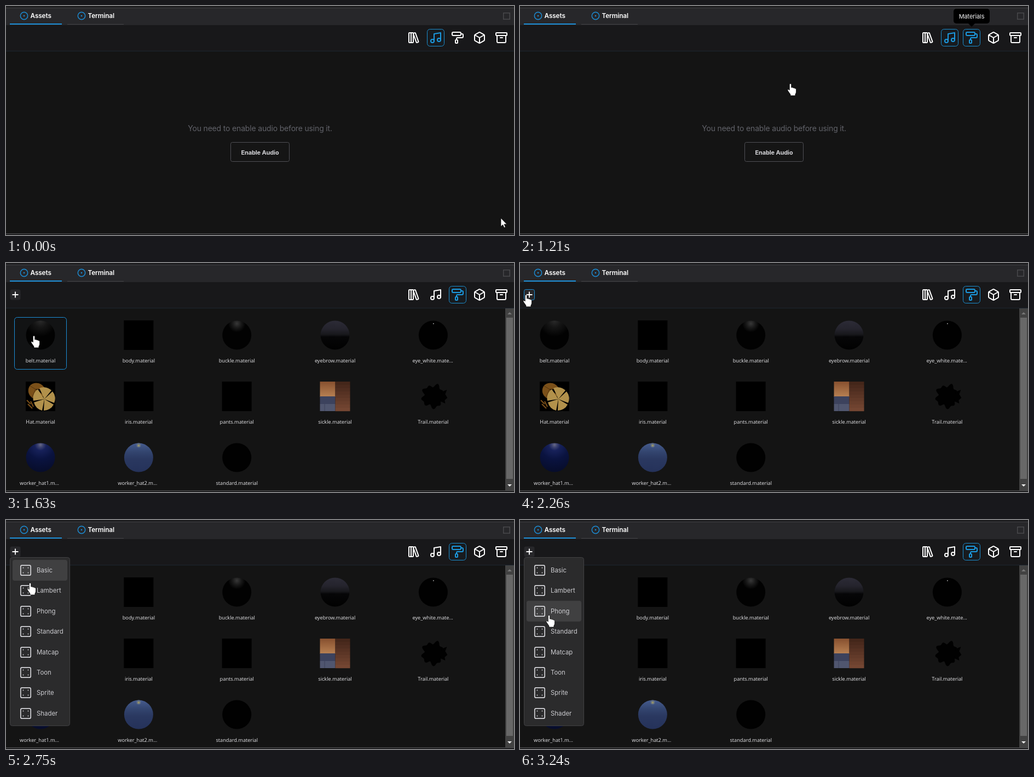
These frames come from a looping animation (928x419 px, 3.58 s). An HTML page:

```html
<!DOCTYPE html>
<html lang="en">
<head>
<meta charset="utf-8">
<title>Asset browser</title>
<style>
  html, body { margin: 0; width: 100%; height: 100%; overflow: hidden; background: #141414; }
  svg { display: block; width: 928px; height: 419px; }
  text { font-family: Inter, "Noto Sans", sans-serif; }
  .label { font: 500 9.3px "Open Sans", "Noto Sans", sans-serif; fill: #e4e4e7; letter-spacing: -.04px; }
  .tab { font-size: 11.8px; font-weight: 600; fill: #fff; letter-spacing: -.12px; }
  .icon { fill: none; stroke: #fff; stroke-width: 2; stroke-linecap: round; stroke-linejoin: round; }
  .tool.on .icon { stroke: #1c9ae0; }
  .tool .frame { fill: #171b1f; stroke: #1c8fd0; visibility: hidden; }
  .tool.on .frame { visibility: visible; }
  .entry { font-size: 11.4px; fill: #cbcbcf; }
</style>
</head>
<body>
<svg id="stage" viewBox="0 0 928 419" xmlns="http://www.w3.org/2000/svg"></svg>
<script>
const LOOP = 3580;
const BLUE = '#1c8fd8';
const stage = document.getElementById('stage');

const rect = (x, y, w, h, fill, extra = '') =>
  `<rect x="${x}" y="${y}" width="${w}" height="${h}" fill="${fill}" ${extra}/>`;
const disc = (x, y, r, fill, extra = '') =>
  `<circle cx="${x}" cy="${y}" r="${r}" fill="${fill}" ${extra}/>`;
const path = (d, fill, extra = '') => `<path d="${d}" fill="${fill}" ${extra}/>`;
const text = (x, y, str, extra = '') => `<text x="${x}" y="${y}" ${extra}>${str}</text>`;
const group = (id, body, extra = '') => `<g id="${id}" ${extra}>${body}</g>`;
const stops = list => list.map(([at, color]) => `<stop offset="${at}" stop-color="${color}"/>`).join('');
const radial = (id, cy, r, list) =>
  `<radialGradient id="${id}" cx=".5" cy="${cy}" r="${r}">${stops(list)}</radialGradient>`;
const vertical = (id, list) =>
  `<linearGradient id="${id}" x2="0" y2="1">${stops(list)}</linearGradient>`;

const defs = `<defs>
  ${radial('belt', 0, .55, [[0, '#2b2b2b'], [.4, '#161616'], [1, '#020202']])}
  ${radial('buckle', .1, .3, [[0, '#383838'], [.5, '#191919'], [1, '#020202']])}
  ${vertical('eyebrow', [[0, '#2c2b36'], [.28, '#25242d'], [.48, '#17171b'], [.56, '#060607'], [1, '#010101']])}
  ${radial('navy', .06, .9, [[0, '#686a86'], [.1, '#3c4270'], [.22, '#17215a'], [.55, '#0a1340'], [1, '#070d2c']])}
  ${vertical('denim', [[0, '#465c8e'], [.3, '#33456f'], [.55, '#2a3860'], [1, '#25325a']])}
  ${vertical('copper', [[0, '#87502f'], [1, '#b88153']])}
</defs>`;

// Header and tool bar
const tab = (x, name) =>
  disc(x, 18, 6.7, 'none', `stroke="${BLUE}" stroke-width="1.4"`) + disc(x, 18, 1.3, BLUE) +
  text(x + 11.5, 22, name, 'class="tab"');

const header =
  rect(0, 0, 928, 419, '#141414') + rect(0, 0, 928, 3, '#1c1c1e') + rect(0, 3, 928, 1, '#424245') +
  rect(0, 4, 928, 31, '#27272a') + rect(0, 35, 928, 47, '#18181a') + rect(0, 82, 928, 1, '#1d2630') +
  tab(33, 'Assets') + tab(138, 'Terminal') +
  rect(7, 32, 95, 2, BLUE) + rect(112, 33, 103, 1, '#424245') +
  rect(908.75, 12.75, 11.5, 11.5, 'none', 'stroke="#48484b" stroke-width="1.5"');

const toolIcons = [
  '<rect width="8" height="18" x="3" y="3" rx="1"/><path d="M7 3v18M20.4 18.9c.2.5-.1 1.1-.6 1.3l-1.9.7c-.5.2-1.1-.1-1.3-.6L11.1 5.1c-.2-.5.1-1.1.6-1.3l1.9-.7c.5-.2 1.1.1 1.3.6Z"/>',
  '<path d="M9 18V5l12-2v13"/><circle cx="6" cy="18" r="3"/><circle cx="18" cy="16" r="3"/>',
  '<rect width="16" height="6" x="2" y="2" rx="2"/><path d="M10 16v-2a2 2 0 0 1 2-2h8a2 2 0 0 0 2-2V7a2 2 0 0 0-2-2h-2"/><rect width="4" height="6" x="8" y="16" rx="1"/>',
  '<path d="M21 8a2 2 0 0 0-1-1.73l-7-4a2 2 0 0 0-2 0l-7 4A2 2 0 0 0 3 8v8a2 2 0 0 0 1 1.73l7 4a2 2 0 0 0 2 0l7-4A2 2 0 0 0 21 16ZM3.3 7l8.7 5 8.7-5M12 22V12"/>',
  '<rect width="20" height="5" x="2" y="3" rx="1"/><path d="M4 8v11a2 2 0 0 0 2 2h12a2 2 0 0 0 2-2V8M10 12h4"/>'
];
const tools = toolIcons.map((body, i) => group('tool' + i,
  `<rect class="frame" x="${769.5 + 40 * i}" y="42.5" width="31" height="31" rx="5"/>`.replace(769.5 + 40 * i, 729.5 + 40 * i) +
  `<g class="icon" transform="translate(${733 + 40 * i} 46)">${body}</g>`, 'class="tool"')).join('');

const audioPanel =
  text(464, 229, 'You need to enable audio before using it.',
    'text-anchor="middle" font-size="14" letter-spacing="-.17" fill="#616269"') +
  rect(410.5, 249.5, 107, 35, '#151515', 'rx="3" stroke="#505055"') +
  text(464, 272, 'Enable Audio',
    'text-anchor="middle" font-size="11" font-weight="700" letter-spacing="-.13" fill="#d4d4d8"');

// Material thumbnails, drawn around their own centre
const ball = fill => disc(0, 0, 26.5, fill);
const block = rect(-27, -27, 54, 54, '#000');
const hat = block +
  path('M-9-13L6-2A18 18 0 0 1-14 3A15 15 0 0 1-18-21A17 17 0 0 1 8-14Z', '#7b5019') +
  path('M-9-13L8-14M-9-13L-16 3M-9-13L-19-19', 'none', 'stroke="#53340f"') +
  path('M7 5L-2-15A20 20 0 0 1 20-11ZM7 5L22-9A20 20 0 0 1 25 12ZM7 5L24 15A20 20 0 0 1 6 26ZM7 5L3 26A20 20 0 0 1-12 11ZM7 5L-13 8A20 20 0 0 1-5-13Z', '#b2914b') +
  path('M-25 7l7 7M-23 14l8 8M-18 9l5 10', 'none', 'stroke="#7b5019" stroke-width="2"');
const sickle = rect(-27.5, -27, 28, 28, 'url(#copper)') + rect(-27.5, 0, 28, 14, '#3c425d') +
  rect(-27.5, 14, 28, 13, '#50566f') + rect(-20, 14, 2, 13, '#464b64') +
  Array.from({ length: 9 }, (_, i) =>
    rect(.5, -27 + 6 * i, 27, 6.2, `rgb(${68 + 6 * i},${38 + 4 * i},${26 + 3 * i})`)).join('');
const blobEdge = Array.from({ length: 60 }, (_, i) => {
  const a = i * Math.PI / 30, r = 20 + 2.5 * Math.sin(9 * a) + 2 * Math.sin(5 * a + 1);
  return `${(r * Math.cos(a)).toFixed(1)} ${(r * Math.sin(a)).toFixed(1)}`;
}).join('L');
const trail = path(`M${blobEdge}Z`, '#010101') + path('M15-8L25-12 22-4 26 3 21 6 22 13 13 9Z', '#010101');

const materials = [
  ['belt.material', ball('url(#belt)')],
  ['body.material', block],
  ['buckle.material', ball('url(#buckle)')],
  ['eyebrow.material', ball('url(#eyebrow)')],
  ['eye_white.mate...', ball('#010101') + disc(.5, -21, .9, '#b0b0b0')],
  ['Hat.material', hat],
  ['iris.material', block],
  ['pants.material', block],
  ['sickle.material', sickle],
  ['Trail.material', trail],
  ['worker_hat1.m...', ball('url(#navy)')],
  ['worker_hat2.m...', ball('url(#denim)') + disc(0, -22.5, 4, '#626f83') + disc(0, -22, 2, '#96946a')],
  ['standard.material', ball('#010101')]
];
const grid = materials.map(([name, art], i) => {
  const x = 63 + 179.35 * (i % 5), y = 132 + 112 * Math.floor(i / 5);
  const cut = name.endsWith('...');
  return `<g transform="translate(${x} ${y})">${art}</g>` +
    text(cut ? x - 38 : x, y + 50, name, `class="label" text-anchor="${cut ? 'start' : 'middle'}"`);
}).join('');

const scrollbar = rect(912, 83, 16, 333, '#424242') + rect(914, 100, 12, 295, '#686868') +
  path('M916 94l4-4 4 4Z', '#777') + path('M916 405l4 4 4-4Z', '#f0f0f0');

const materialPanel =
  rect(7.5, 48.5, 19, 19, '#27272a', 'id="plus" rx="3"') +
  path('M11.5 58h11M17 52.5v11', 'none', 'stroke="#fff" stroke-width="1.8"') +
  rect(15.5, 99.5, 95, 95, '#121314', `id="card" rx="5" stroke="${BLUE}"`) + grid + scrollbar;

// Drop-down menu
const ROW = 37.4;
const entries = ['Basic', 'Lambert', 'Phong', 'Standard', 'Matcap', 'Toon', 'Sprite', 'Shader'];
const menu = rect(7.5, 68.5, 109, 308, '#2b2b2c', 'rx="4" stroke="#414143"') +
  rect(12, 73, 100, 38, '#404041', 'id="hover" rx="4"') +
  entries.map((name, i) => {
    const y = Math.round(92 + ROW * i);
    const dots = [-4.5, 4.5].map(dx => [-4.5, 4.5].map(dy =>
      disc(36 + dx, y + dy, .9, '#d4d4d8')).join('')).join('');
    return rect(26.8, y - 9.2, 18.4, 18.4, 'none', 'rx="2.5" stroke="#d4d4d8" stroke-width="1.7"') +
      dots + text(56, y + 4, name, 'class="entry"');
  }).join('');

const tooltip = rect(792, 5, 66, 27, '#000', 'rx="5"') + path('M819 32h12l-6 6Z', '#000') +
  text(825, 22.5, 'Materials', 'text-anchor="middle" font-size="11" letter-spacing="-.1" fill="#f4f4f5"');

const arrow = path('M0 0V15.5L3.6 12.2 6 17.6 8.4 16.6 6 11.3H10.8Z', '#fff',
  'id="arrow" stroke="#000" stroke-width=".7"');
const hand = path('M-1.7 12V1.8a1.7 1.7 0 0 1 3.4 0V7.2q2.6-1 3.2.8q2.5-.8 3 .9q2.6-.5 2.6 1.8V15q0 2.5-1.6 4.5V22H0V19.8L-4.7 13q-.9-2 .5-2.5q1-.2 2.5 1.5Z',
  '#fff', 'id="hand" stroke="#000" stroke-width=".7"');

stage.innerHTML = defs + header + tools + group('audio', audioPanel) + group('materials', materialPanel) +
  rect(0, 416, 928, 1, '#515153') + rect(0, 417, 928, 2, '#1d1d1f') +
  group('menu', menu) + group('tooltip', tooltip) + group('cursor', arrow + hand);

// The picture advances in discrete steps
const steps = [0, 70, 140, 210, 280, 350, 420, 490, 540, 610, 740, 870, 1000, 1070];
for (let t = 1140; t <= 3240; t += 70) steps.push(t);

// Pointer route: time, x, y
const route = [
  [0, 904, 388], [140, 898, 362], [210, 885, 305], [350, 849, 145], [420, 833, 86], [490, 827, 62],
  [610, 826, 57], [870, 826, 59], [1000, 823, 61], [1070, 794, 75], [1140, 667, 112], [1210, 494, 142],
  [1280, 330, 157], [1350, 200, 156], [1420, 112, 148], [1490, 68, 139], [1630, 51, 133],
  [1770, 43, 126], [1910, 24, 102], [2050, 7, 60], [2120, 5, 46], [2260, 11, 58],
  [2400, 12, 60], [2540, 22, 78], [2680, 38, 104], [2750, 44, 115],
  [2890, 48, 135], [3030, 51, 155], [3240, 53, 174]
];

function pointerAt(t) {
  const next = route.findIndex(key => key[0] > t);
  if (next < 0) return route[route.length - 1].slice(1);
  const [t0, x0, y0] = route[next - 1], [t1, x1, y1] = route[next];
  const k = (t - t0) / (t1 - t0);
  return [Math.round(x0 + (x1 - x0) * k), Math.round(y0 + (y1 - y0) * k)];
}

const el = id => document.getElementById(id);
const show = (id, on) => el(id).setAttribute('visibility', on ? 'inherit' : 'hidden');

function render(time) {
  const t = steps.filter(s => s <= time).pop();
  const [x, y] = pointerAt(t);
  const loaded = t >= 1280, open = t >= 2400;
  const onCard = t >= 1420 && t < 2260 && x > 15 && y > 99;
  const onPlus = t >= 1980 && !open && y < 68;

  el('tool1').classList.toggle('on', !loaded);
  el('tool2').classList.toggle('on', t >= 490);
  show('audio', !loaded);
  show('materials', loaded);
  show('card', onCard);
  el('plus').setAttribute('stroke', onPlus ? BLUE : 'none');

  show('tooltip', t >= 540 && !loaded);
  el('tooltip').setAttribute('opacity', t < 610 ? .6 : 1);

  const row = t < 2820 ? 0 : t < 3100 ? 1 : 2;
  show('menu', open);
  show('hover', open && t >= 2540);
  el('hover').setAttribute('y', 73 + ROW * row);

  const pointing = t >= 490 && (t < 1280 || onCard || onPlus || open);
  show('hand', pointing);
  show('arrow', !pointing);
  el('cursor').setAttribute('transform', `translate(${x} ${y})`);
}

const start = performance.now();
function tick() {
  render((performance.now() - start) % LOOP);
  requestAnimationFrame(tick);
}
tick();
</script>
</body>
</html>
```
